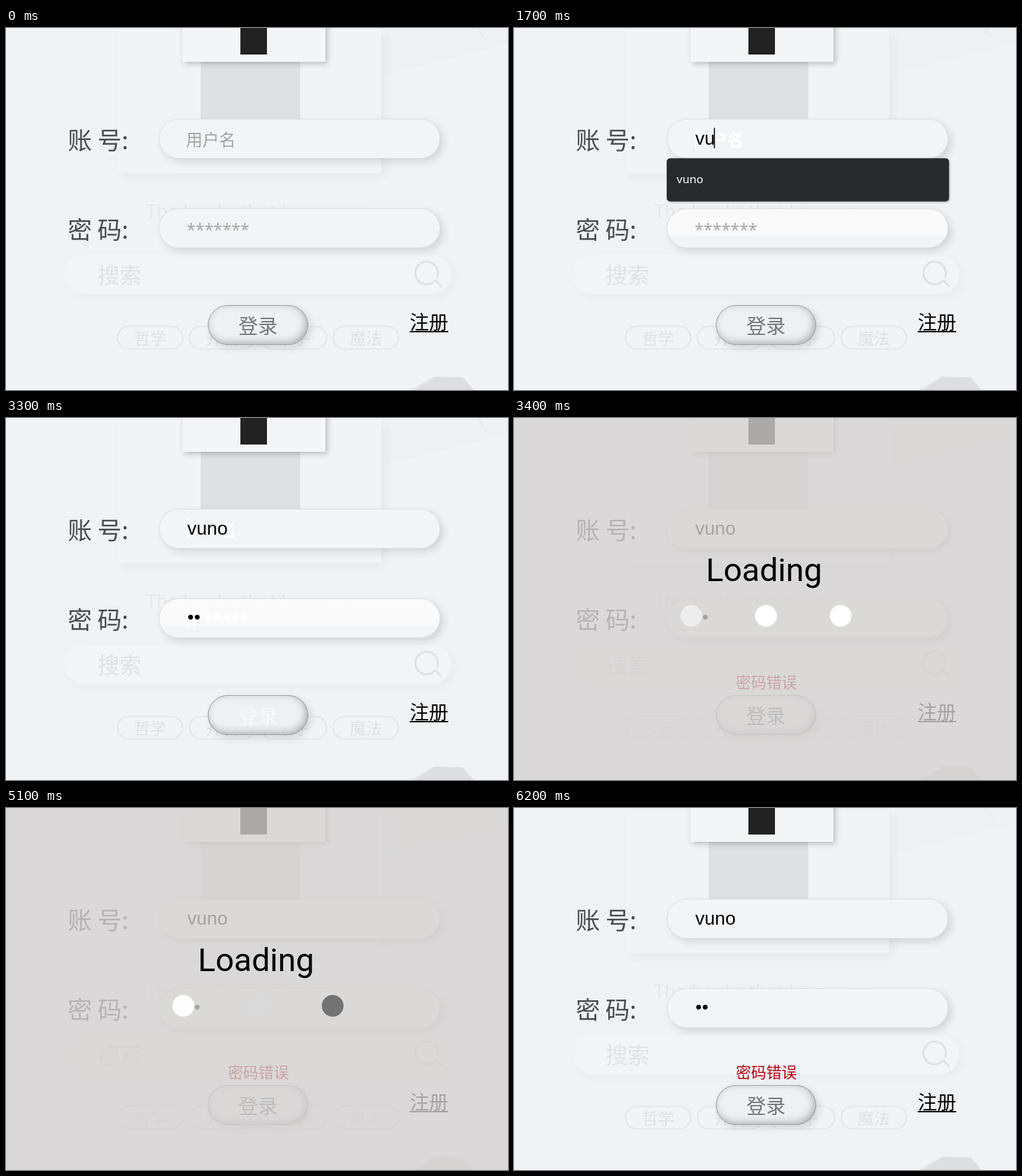
Animation of 756 by 546 pixels, one loop 7800 ms. Source, as an HTML page with a canvas:

```html
<!DOCTYPE html>
<html lang="zh-CN">
<head>
<meta charset="utf-8">
<style>
  html, body { margin: 0; width: 100%; height: 100%; overflow: hidden; background: #f0f3f6; }
  canvas { display: block; }
</style>
</head>
<body>
<canvas id="stage" width="756" height="546"></canvas>
<script>
const ctx = document.getElementById('stage').getContext('2d');
const LOOP = 7800, STEP = 100;
const CJK = '"Noto Sans CJK SC", "Noto Sans CJK", sans-serif';
const LATIN = '"Noto Sans", sans-serif';
const ARIAL = '"Liberation Sans", Arial, sans-serif';
const USER = 'vuno', OTHER_USER = 'lumi';
const FIELD = '#f2f5f8';

// Runs a drawing with canvas settings that do not leak out.
function scoped(settings, draw) {
  ctx.save();
  Object.assign(ctx, settings);
  draw();
  ctx.restore();
}

function text(string, x, y, size, color, family = CJK, weight = family === CJK ? 350 : 400) {
  ctx.font = `${weight} ${size}px ${family}`;
  ctx.fillStyle = color;
  ctx.fillText(string, x, y);
}

function box(x, y, w, h, r, fill, stroke, lineWidth = 1) {
  ctx.beginPath();
  ctx.roundRect(x, y, w, h, r);
  if (fill) { ctx.fillStyle = fill; ctx.fill(); }
  if (stroke) scoped({ strokeStyle: stroke, lineWidth, shadowColor: 'transparent' }, () => ctx.stroke());
}

function shadowBox(alpha, offset, blur, ...args) {
  scoped({ shadowColor: `rgba(60,60,60,${alpha})`, shadowOffsetX: offset, shadowOffsetY: offset, shadowBlur: blur },
    () => box(...args));
}

function polygon(fill, ...points) {
  ctx.beginPath();
  points.forEach(([x, y]) => ctx.lineTo(x, y));
  ctx.fillStyle = fill;
  ctx.fill();
}

function disc(x, y, r, fill) {
  ctx.beginPath();
  ctx.arc(x, y, r, 0, Math.PI * 2);
  ctx.fillStyle = fill;
  ctx.fill();
}

function rect(x, y, w, h, fill) {
  ctx.fillStyle = fill;
  ctx.fillRect(x, y, w, h);
}

function clipped(x, y, w, h, draw) {
  scoped({}, () => {
    ctx.beginPath();
    ctx.rect(x, y, w, h);
    ctx.clip();
    draw();
  });
}

function drawBackdrop() {
  rect(0, 0, 756, 546, '#f0f3f6');
  polygon('#eef1f4', [572, 70], [756, 24], [756, 0], [572, 0]);
  polygon('#e8eaed', [708, 0], [712, 0], [726, 24]);
  polygon('#e6e8ea', [608, 546], [645, 526], [640, 546]);
  polygon('#dcdee0', [616, 546], [645, 526], [688, 527], [704, 546]);

  shadowBox(.05, 6, 14, 168, 2, 397, 217, 2, '#f1f4f6');
  rect(293, 35, 150, 150, '#dee0e2');
  text('The books that know you', 211, 286, 28, '#e6e8ea', LATIN);

  shadowBox(.03, 6, 14, 88, 342, 583, 59, 30, '#f2f5f7');
  text('搜索', 138, 385, 33, '#e0e2e4');
  scoped({ strokeStyle: '#dfe1e3', lineWidth: 3 }, () => {
    ctx.beginPath();
    ctx.arc(633.5, 369.5, 17, .8, 6.7);
    ctx.moveTo(646, 380);
    ctx.lineTo(656, 390);
    ctx.stroke();
  });
  ['哲学', '开发', '亲子', '魔法'].forEach((tag, i) => {
    const x = 168 + i * 108.3;
    box(x, 450, 98, 34, 17, '#f1f4f6', '#e6e8ea', 2.5);
    text(tag, x + 25, 477, 24, '#dfe1e3');
  });

  shadowBox(.3, 3, 8, 266, -20, 215, 71, 0, '#f3f5f7');
  rect(353, 0, 40, 40, '#222');
}

function drawField(y) {
  shadowBox(.17, 5, 12, 230.5, y + .5, 423, 59, 29.5, FIELD, '#dee0e2');
}

function drawButton(color) {
  shadowBox(.18, 4, 12, 304.5, 418.5, 150, 59, 29.5, '#eef1f4');
  scoped({}, () => {
    ctx.beginPath();
    ctx.roundRect(304.5, 418.5, 150, 59, 29.5);
    ctx.clip();
    ctx.shadowColor = 'rgba(60,60,60,.38)';
    ctx.shadowOffsetX = ctx.shadowOffsetY = -3;
    ctx.shadowBlur = 12;
    ctx.beginPath();
    ctx.rect(250, 370, 260, 160);
    ctx.roundRect(304.5, 418.5, 150, 59, 29.5);
    ctx.fill('evenodd');
  });
  box(304.5, 418.5, 150, 59, 29.5, null, '#a0a1a2');
  text('登录', 350, 460, 29.5, color);
}

function caret(x, y) {
  rect(x, y, 1.5, 31, '#000');
}

function drawUser(t) {
  drawField(137);
  if (t < 400) return text('用户名', 271, 178, 25, '#a3a3a3');

  if (t < 3400) {
    const left = t < 1200 ? 270 : t < 1700 ? 288 : t < 2000 ? 300 : 328;
    clipped(left, 140, 360 - left, 55, () => text('用户名', 271, 178, 25, '#fff', CJK, 700));
    if (t >= 1200) rect(273, 151, 1.5, 31, '#fff');
  }
  const typed = t < 1200 ? 0 : t < 1700 ? 1 : t < 2000 ? 2 : 4;
  text(USER.slice(0, typed), 273, 176, 28, '#000', ARIAL);
  const blinkOn = t < 900 || (t >= 1200 && t < 2500);
  if (blinkOn) caret([273, 287, 301, 0, 333.5][typed], 150.5);
}

function drawPassword(t) {
  drawField(272);
  if (t >= 1200 && t < 3400) {
    clipped(228, 270, 430, 43, () => box(230.5, 272.5, 423, 59, 29.5, '#fafafa', '#dee0e2'));
  }
  if (t < 2700) return text('*******', 272, 313, 24.5, '#a5a5a5', LATIN);

  if (t < 3400) {
    const left = t < 2900 ? 270 : t < 3000 ? 284 : 296;
    clipped(left, 280, 375 - left, 38, () => text('*******', 272, 313, 24.5, '#fff', LATIN, 700));
    if (t >= 2900) rect(273, 286, 1.5, 31, '#fff');
    if (t >= 3000) rect(283, 286, 1.5, 31, '#fff');
  }
  const typed = t < 2900 ? 0 : t < 3000 ? 1 : 2;
  for (let i = 0; i < typed; i++) disc(278 + i * 10, 300.3, 3.6, '#000');
  if (t < 3300) caret(273 + typed * 9.5, 286);
}

function drawSuggestions(t) {
  if (t < 500 || t >= 2100) return;
  const names = t < 1300 ? [USER, OTHER_USER] : [USER];
  shadowBox(.5, 1, 3, 230, 196.5, 425, 17 + 48 * names.length, 5, '#292a2d');
  names.forEach((name, i) => text(name, 245, 234 + i * 48, 17, '#fff', LATIN));
}

function drawLoading(t) {
  const period = 1830, lag = 256, start = 3243;
  rect(0, 0, 756, 546, 'rgba(212,209,208,.78)');
  text('Loading', 289, 246, 49, '#000', 'Roboto, sans-serif');
  for (let i = 0; i < 3; i++) {
    const elapsed = Math.max(0, t - start - i * lag);
    const level = Math.round(127.5 * (1 + Math.cos(elapsed / period * Math.PI * 2)));
    disc(267 + i * 112.5, 298.3, 16.4, `rgb(${level},${level},${level})`);
  }
}

function draw(t) {
  drawBackdrop();
  text('账 号:', 93, 183, 36.5, '#474b52');
  text('密 码:', 93, 318, 36.5, '#474b52');
  drawUser(t);
  drawPassword(t);
  drawButton(t >= 3300 && t < 3400 ? '#f6f8fa' : '#74777a');
  text('注册', 608, 455, 29, '#000');
  rect(608, 457, 58, 2, '#000');
  if (t >= 3400) text('密码错误', 334, 407, 23, '#b9000f');
  drawSuggestions(t);
  if (t >= 3400 && t < 6200) drawLoading(t);
}

const origin = performance.now();
function tick() {
  const t = (performance.now() - origin) % LOOP;
  draw(Math.floor(t / STEP) * STEP);
  requestAnimationFrame(tick);
}
tick();
</script>
</body>
</html>
```
